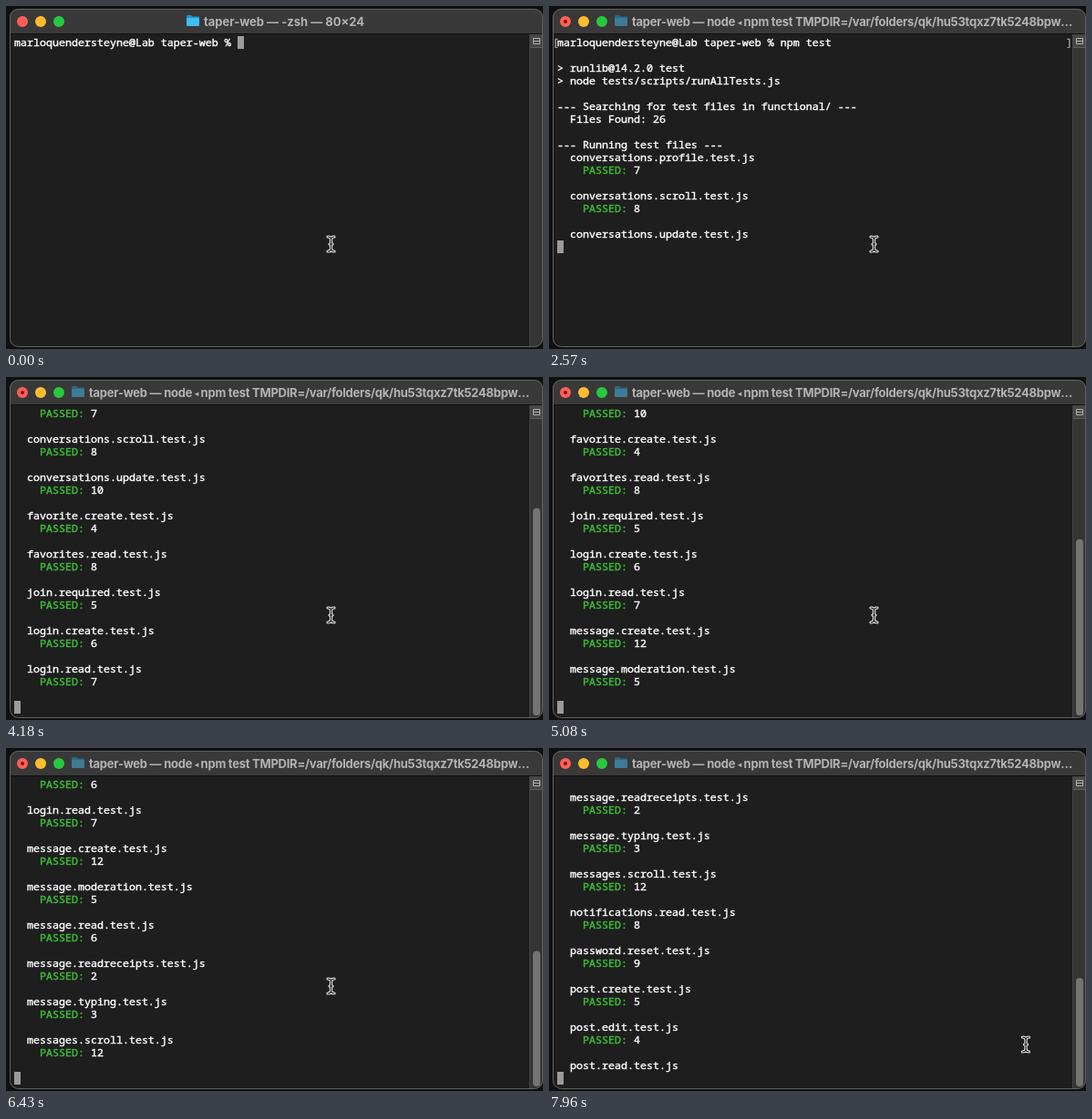
An HTML page for the animation above (8 s loop, 589x376 px).

```html
<!DOCTYPE html>
<html lang="en">
<head>
<meta charset="utf-8">
<title>Test run</title>
<style>
  html, body { margin: 0; width: 100%; height: 100%; overflow: hidden; background: #0f0f0f; }
  #stage { position: relative; width: 589px; height: 376px; overflow: hidden; }
  svg { position: absolute; left: 0; top: 0; }
  #title {
    position: absolute; top: 7px; height: 20px; width: 484px;
    font: 700 13px/20px Inter, "Open Sans", sans-serif; color: #b3b3b3;
    white-space: nowrap; overflow: hidden; text-overflow: ellipsis;
  }
  #title.tight { letter-spacing: -0.25px; }
  #title small { font-size: 8px; vertical-align: 1px; line-height: 1; }
  #log {
    position: absolute; left: 9px; top: 33px; width: 560px; height: 336px;
    font: 500 11.667px/14px "Noto Sans Mono", "DejaVu Sans Mono", monospace;
    -webkit-text-stroke: 0.4px currentColor;
    font-variant-ligatures: none; color: #fff; white-space: pre;
  }
  #log div { position: relative; height: 14px; }
  #log i { position: absolute; top: 0; font-style: normal; color: #a0a0a0; }
  #log b { font-weight: inherit; color: #3ac233; }
  #caret { position: absolute; width: 7px; height: 14px; background: #9b9b9b; }
</style>
</head>
<body>
<div id="stage">
  <svg width="589" height="376" viewBox="0 0 589 376">
    <defs>
      <clipPath id="win"><rect x="4" y="3" width="585" height="371" rx="9.5"/></clipPath>
    </defs>
    <g clip-path="url(#win)">
      <rect x="4" y="3" width="585" height="371" fill="#1e1e1e"/>
      <rect x="4" y="3" width="585" height="28" fill="#393939"/>
      <rect x="4" y="30" width="585" height="1" fill="#111"/>
      <rect x="574" y="31" width="15" height="343" fill="#353535"/>
      <rect x="574" y="31" width="1" height="343" fill="#454545"/>
      <rect x="575" y="31" width="14" height="15" fill="#474747"/>
      <rect x="575" y="45" width="14" height="1" fill="#5c5c5c"/>
      <path d="M578.5 35.5h7v6h-7zM578.5 38.5h7" fill="none" stroke="#b0b0b0"/>
    </g>
    <rect x="4.5" y="3.5" width="584" height="370" rx="9" fill="none" stroke="#626262"/>
    <circle cx="18" cy="17" r="6" fill="#ff5f57"/>
    <circle id="busy" cx="18" cy="17" r="2" fill="#7d0f0a"/>
    <circle cx="38" cy="17" r="6" fill="#febc2e"/>
    <circle cx="58" cy="17" r="6" fill="#28c840"/>
    <g id="folder">
      <path d="M0 2.2Q0 1 1.2 1H5l1.6 1.6H13Q14 2.6 14 3.6V12H0z" fill="#1d94cf"/>
      <rect y="4" width="14" height="9" rx="1.2" fill="#41bdf2"/>
    </g>
    <rect id="thumb" x="578" width="8" rx="4" fill="#747474"/>
  </svg>
  <div id="title"></div>
  <div id="log"></div>
  <div id="caret"></div>
  <svg width="589" height="376" viewBox="0 0 589 376">
    <defs>
      <path id="beam" d="M-3.5-8Q0-8 0-5Q0-8 3.5-8M0-5V5M-3.5 8Q0 8 0 5Q0 8 3.5 8M-1.5 0H1.5"/>
    </defs>
    <g id="mouse" fill="none" stroke-linecap="round" stroke-linejoin="round">
      <use href="#beam" stroke="#f4f4f4" stroke-width="3.2"/>
      <use href="#beam" stroke="#111" stroke-width="1.1"/>
    </g>
  </svg>
</div>
<script>
const LOOP = 8000, ROWS = 24, CELL = 7, LINE = 14, LEFT = 9, TOP = 33;
const TYPED = 500, ENTER = 1040, BUSY = 1130, START = 1400;

const folderName = 'taper-web';
const prompt = `marloquendersteyne@Lab ${folderName} % `;
const command = 'npm test';
const tail = 'TMPDIR=/var/folders/qk/hu53tqxz7tk5248bpw0000gn/T/ run';

const header = [
  '',
  '&gt; runlib@14.2.0 test',
  '&gt; node tests/scripts/runAllTests.js',
  '',
  '--- Searching for test files in functional/ ---',
  '  Files Found: 26',
  '',
  '--- Running test files ---'
];

const tests = [
  ['conversations.profile', 7], ['conversations.scroll', 8], ['conversations.update', 10],
  ['favorite.create', 4], ['favorites.read', 8], ['join.required', 5],
  ['login.create', 6], ['login.read', 7], ['message.create', 12],
  ['message.moderation', 5], ['message.read', 6], ['message.readreceipts', 2],
  ['message.typing', 3], ['messages.scroll', 12], ['notifications.read', 8],
  ['password.reset', 9], ['post.create', 5], ['post.edit', 4], ['post.read', 6]
];

// Alternating moments: a file name is printed, then its result.
const events = [
  1760, 2120, 2300, 2480, 2570, 2750, 2930, 3110, 3200, 3380, 3470, 3650, 3830,
  4010, 4100, 4180, 4360, 4720, 4900, 5080, 5260, 5440, 5530, 5710, 5890, 6070,
  6250, 6430, 6610, 6790, 6880, 7150, 7330, 7510, 7600, 7780, 7870
];

const el = id => document.getElementById(id);
const title = el('title'), log = el('log'), caret = el('caret'), thumb = el('thumb');
const folder = el('folder'), busy = el('busy'), mouse = el('mouse');
const row = html => `<div>${html}</div>`;

function linesAt(t) {
  const first = prompt + (t >= TYPED ? command : '');
  if (t < ENTER) return [first];
  const lines = [`<i style="left:-5px">[</i>${first}<i style="left:558px">]</i>`];
  if (t >= START) lines.push(...header);
  events.forEach((at, n) => {
    if (t < at) return;
    const [name, passed] = tests[n >> 1];
    if (n % 2) lines.push(`    <b>PASSED:</b> ${passed}`, '');
    else lines.push(`  ${name}.test.js`);
  });
  lines.push('');
  return lines;
}

function drawLog(t) {
  const lines = linesAt(t);
  const skip = Math.max(0, lines.length - ROWS);
  const col = t < TYPED ? prompt.length : t < ENTER ? prompt.length + command.length : 0;
  log.innerHTML = lines.slice(skip).map(row).join('');
  caret.style.left = LEFT + col * CELL + 'px';
  caret.style.top = TOP + (lines.length - 1 - skip) * LINE + 'px';

  const size = 322 * ROWS / lines.length;
  thumb.setAttribute('visibility', skip ? 'visible' : 'hidden');
  thumb.setAttribute('height', size);
  thumb.setAttribute('y', 371 - size);
}

function drawTitle(t) {
  const on = t >= BUSY, x = on ? 91 : 217;
  const job = (t >= START ? 'node <small>◂</small> ' : '') + 'npm test ';
  title.innerHTML = `${folderName} — ` + (on ? job + tail : '-zsh — 80×24');
  title.className = on ? 'tight' : '';
  title.style.left = x + 'px';
  folder.setAttribute('transform', `translate(${x - 19} 9)`);
  folder.setAttribute('opacity', on ? 0.5 : 1);
  busy.setAttribute('visibility', on ? 'visible' : 'hidden');
}

function drawMouse(t) {
  let x = 356.5, y = 261;
  if (t >= 7330) {
    const p = Math.min(1, Math.floor((t - 7330) / 90) / 7);
    const e = p * (1.3 - 0.3 * p);
    x = 378 + 145 * e;
    y = 260 + 65 * e;
  } else if (t >= 7240) {
    x = 362;
  }
  mouse.setAttribute('transform', `translate(${x} ${y})`);
}

const marks = [TYPED, ENTER, BUSY, START, ...events];
let shown = -1;

function frame() {
  const t = performance.now() % LOOP;
  const step = marks.filter(m => t >= m).length;
  if (step !== shown) {
    shown = step;
    drawLog(t);
    drawTitle(t);
  }
  drawMouse(t);
  requestAnimationFrame(frame);
}
frame();
</script>
</body>
</html>
```
